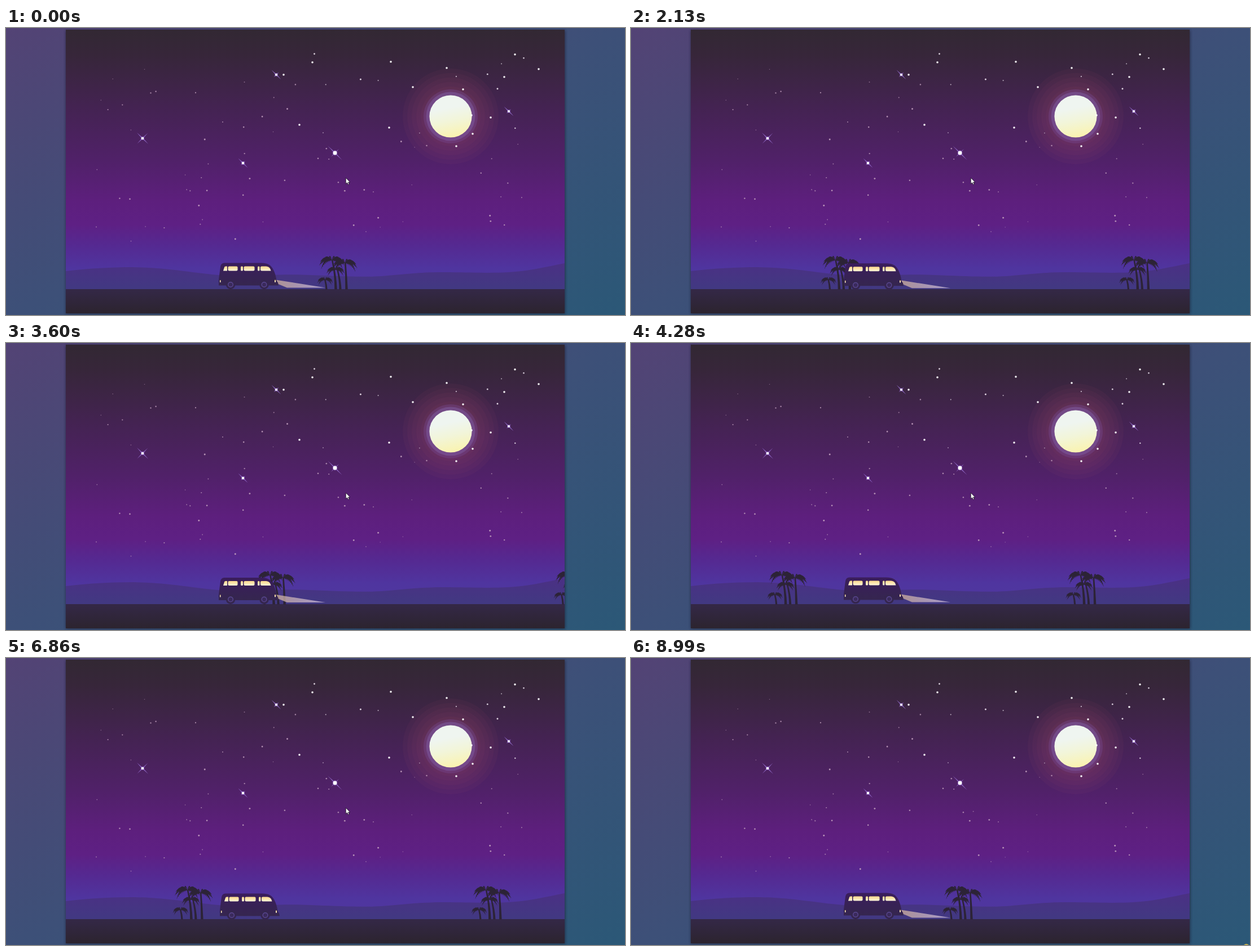
These frames come from a looping animation (1097x510 px, 9.07 s). An HTML page:

```html
<!DOCTYPE html>
<html lang="en">
<head>
<meta charset="utf-8">
<title>Night drive</title>
<style>
html, body { margin: 0; width: 100%; height: 100%; overflow: hidden; background: #3e5078; }
svg { display: block; width: 100vw; height: 100vh; }
</style>
</head>
<body>
<svg viewBox="0 0 1097 510" preserveAspectRatio="none">
  <defs>
    <linearGradient id="page" x1="0" y1="0" x2="1" y2="1">
      <stop offset="0" stop-color="#534375"/><stop offset=".5" stop-color="#3d5078"/><stop offset="1" stop-color="#2b5877"/>
    </linearGradient>
    <linearGradient id="sky" gradientUnits="userSpaceOnUse" x1="0" y1="3" x2="0" y2="464">
      <stop offset="0" stop-color="#322833"/><stop offset=".1" stop-color="#37263a"/>
      <stop offset=".3" stop-color="#442352"/><stop offset=".5" stop-color="#502168"/>
      <stop offset=".66" stop-color="#5d1f7d"/><stop offset=".75" stop-color="#5e2084"/>
      <stop offset=".83" stop-color="#552991"/><stop offset=".92" stop-color="#4f359f"/>
      <stop offset="1" stop-color="#4f389f"/>
    </linearGradient>
    <linearGradient id="hill" x1="0" y1="0" x2="0" y2="1">
      <stop offset="0" stop-color="#4b3084"/><stop offset="1" stop-color="#413982"/>
    </linearGradient>
    <linearGradient id="ground" x1="0" y1="0" x2="0" y2="1">
      <stop offset="0" stop-color="#342847"/><stop offset="1" stop-color="#2c242f"/>
    </linearGradient>
    <linearGradient id="moon" x1=".4" y1="0" x2=".6" y2="1">
      <stop offset=".3" stop-color="#eff5f0"/><stop offset=".6" stop-color="#f2f5d9"/><stop offset="1" stop-color="#faf3ae"/>
    </linearGradient>
    <linearGradient id="van" x1="0" y1="0" x2="0" y2="1">
      <stop offset="0" stop-color="#3a1d5c"/><stop offset="1" stop-color="#35264f"/>
    </linearGradient>
    <linearGradient id="glass" x1="0" y1="0" x2="0" y2="1">
      <stop offset="0" stop-color="#fbd88d"/><stop offset=".45" stop-color="#fde5ab"/><stop offset="1" stop-color="#fff6dc"/>
    </linearGradient>
    <linearGradient id="ray" x1="0" y1="0" x2="1" y2="0">
      <stop offset="0" stop-color="#d3b39a"/><stop offset=".35" stop-color="#ccb4b8"/><stop offset="1" stop-color="#cfc0e2"/>
    </linearGradient>
    <filter id="shadow" x="-5%" y="-5%" width="110%" height="110%"><feGaussianBlur stdDeviation="2"/></filter>
    <clipPath id="frame"><rect x="106" y="3" width="884" height="504"/></clipPath>
  </defs>

  <rect width="1097" height="510" fill="url(#page)"/>
  <circle id="dot" cx="1090.5" cy="514" r="6" fill="#c8b150"/>
  <rect x="106" y="4" width="885" height="504" fill="#1b1a30" opacity=".7" filter="url(#shadow)"/>

  <g clip-path="url(#frame)">
    <rect x="106" y="3" width="884" height="504" fill="url(#sky)"/>
    <g id="halo"></g>
    <circle cx="788" cy="157" r="37.6" fill="url(#moon)"/>
    <g id="stars"></g>
    <path fill="url(#hill)" d="M106 432C150 427 185 425 225 425C300 426 345 439 400 440C460 440 490 437 540 439C590 441 630 443 665 441C705 438 730 434 775 434C820 434 850 436 890 434C925 432 955 425 990 418V465H106Z"/>
    <rect x="106" y="464" width="884" height="43" fill="url(#ground)"/>
    <g id="palms" fill="#2c2336"></g>
    <g id="bus">
      <path id="beam" d="M478 447.5L566 461.5H498L479 453.5Z" fill="url(#ray)" opacity=".74"/>
      <path fill="url(#van)" d="M377 457.5V447L380 424Q381 417.5 387 417.5H452C464 417.5 469 421 473 428Q478 437 479.5 449L482 452.5L483 457.5Z"/>
      <g fill="url(#glass)">
        <path d="M385 431.5L387 425Q387.5 423.5 389 423.5H392V431.5Z"/>
        <rect x="393.5" y="423.5" width="17" height="8" rx="2"/>
        <rect x="416" y="423.5" width="4" height="8" rx="1.5"/>
        <rect x="421.5" y="423.5" width="19" height="8" rx="2"/>
        <rect x="446" y="423.5" width="3.5" height="8" rx="1.5"/>
        <path d="M451 425Q451 423.5 453 423.5H461Q466 424 468 427.5L469.5 431.5H453Q451 431.5 451 429.5Z"/>
        <rect x="379" y="448" width="1.5" height="4"/>
        <rect x="476" y="447.5" width="2" height="4.5" rx="1"/>
      </g>
      <g id="wheels"></g>
    </g>
  </g>
  <path id="cursor" d="M0 0V10.8L2.5 8.4L4.2 12L6 11.2L4.4 7.7H7.6Z" fill="#fff" stroke="#15101c" stroke-width=".8"/>
</svg>

<script>
const LOOP = 9070, TICK = 77, STEP = 22.28, GAP = 529;
const $ = id => document.getElementById(id);
const range = n => [...Array(n).keys()];

let seed = 7;
function random() {
  seed = (seed * 16807) % 2147483647;
  return seed / 2147483647;
}

// Moon glow: stacked pale discs, then two brighter rims
const disc = (r, fill, opacity) => `<circle cx="788" cy="157" r="${r}" fill="${fill}" opacity="${opacity}"/>`;
$('halo').innerHTML = range(5).map(i => disc(85 - 8 * i, '#96466a', .07)).join('') +
  disc(48, '#7a4a94', .35) + disc(43.5, '#8060a8', .45);

const star = (x, y, r, fill, opacity) => `<circle cx="${x}" cy="${y}" r="${r}" fill="${fill}" opacity="${opacity}"/>`;

// Small stars grow rosier and dimmer towards the horizon
function smallStar() {
  const x = 160 + 790 * random(), y = 45 + 335 * random(), size = random();
  return Math.hypot(x - 788, y - 157) < 50 ? '' :
    star(x.toFixed(1), y.toFixed(1), .7 + .8 * size, y < 200 && x > 520 ? '#f3eaf5' : '#c3a0bf', .55 + .35 * size);
}

// Diagonal sparkle: a long ray down-right and a shorter one across it
function sparkle(x, y, long, short, r) {
  const ray = (l, w) => `M${-l} ${-l}L${w} ${-w}L${l} ${l}L${-w} ${w}Z`;
  return `<g transform="translate(${x} ${y})" fill="#9c74d8"><path d="${ray(long, .8)}" opacity=".8"/>
    <path d="${ray(short, .8)}" transform="scale(-1 1)" opacity=".7"/>
    <circle r="${r + 1}" opacity=".5"/><circle r="${r}" fill="#fff"/></g>`;
}

const bright = [[543,61], [682,60], [781,71], [902,47], [944,73], [883,87], [721,105], [810,109],
  [859,159], [827,188], [798,210], [679,177], [520,172], [492,83], [825,155]];
$('stars').innerHTML = range(80).map(smallStar).join('') +
  bright.map(([x, y]) => star(x, y, 1.8, '#fff', .95)).join('') +
  sparkle(242, 196, 10, 9.5, 2.3) + sparkle(420, 240, 8.5, 4, 2.2) + sparkle(583, 222, 12.5, 7, 3.4) +
  sparkle(479, 83, 8.5, 4.5, 2) + sparkle(891, 148, 8.5, 4, 2);

// Curved frond with a ragged lower edge
function frond(x, y, dx, dy, lift, w) {
  const at = t => [x + 1.2 * t * (1 - t) * dx + t * t * dx, y - 2 * t * (1 - t) * lift + t * t * dy];
  const top = range(11).map(i => at(i / 10));
  const under = range(19).map(i => {
    const t = 1 - (i + 1) / 20, [px, py] = at(t);
    const drop = w * Math.sin(Math.PI * t ** .8) * (i % 2 ? .5 : 1);
    return [px - Math.sign(dx) * drop * .35, py + drop];
  });
  return 'M' + [...top, ...under].map(p => p.map(v => v.toFixed(1)).join(' ')).join('L') + 'Z';
}

// Fronds fan out evenly and sag at the sides
function crown(x, y, s) {
  const fan = range(10).map(i => {
    const a = (-32 + i * 244 / 9) * Math.PI / 180;
    return frond(x, y, 22.5 * s * Math.cos(a), s * (9 - 14 * Math.sin(a)), 11 * s, 7 * s);
  });
  return `<path d="${fan.join('')}"/>`;
}

function trunk(x, y, foot, w) {
  const mid = (y + 464) / 2;
  return `<path d="M${x - 1} ${y}Q${foot - 2} ${mid} ${foot - w} 464.5H${foot + w}Q${foot + 1} ${mid} ${x + 1.5} ${y}Z"/>`;
}

const grove = trunk(578, 413, 584.5, 2.3) + trunk(587, 429, 592.5, 2.1) + trunk(601, 417, 603.5, 2.2) +
  trunk(565, 447, 568, 1.6) + crown(577.5, 412, 1) + crown(600.5, 417, .98) +
  crown(584, 429, .72) + crown(565.5, 447, .62);
$('palms').innerHTML = [0, GAP].map(x => `<g transform="translate(${x})">${grove}</g>`).join('');

$('wheels').innerHTML = [398, 457.5].map(x => `<circle cx="${x}" cy="456" r="8.3" fill="#35264f"/>
  <circle cx="${x}" cy="456" r="4.3" fill="#3a2a5c" stroke="#5a4790" stroke-width="1.4"/>`).join('');

const rides = [{ from: 1440, to: 4980, lead: 15 }, { from: 6040, to: 7460, lead: 11 }];

const show = (id, on) => $(id).style.display = on ? '' : 'none';
const move = (id, x, y) => $(id).setAttribute('transform', `translate(${x} ${y})`);

function draw(t) {
  const ride = rides.find(r => t >= r.from && t < r.to);
  let shift = 0, bob = 0, lit = true;
  if (ride) {
    const n = Math.floor((t - ride.from) / TICK + .45);
    const phase = n % 12 / 11;
    shift = (ride.lead + STEP * n) % GAP;
    bob = -Math.cos(Math.PI * phase);
    lit = phase < 1; // the headlight blinks off once per bounce
  }
  move('palms', -shift, 0);
  move('bus', lit ? 0 : 2, bob);
  show('beam', lit);
  if (t < 8070) move('cursor', 602.2, 266.3);
  else move('cursor', 778, 369);
  show('cursor', t < 8140);
  show('dot', t >= 8990);
}

const start = performance.now();
function loop() {
  draw((performance.now() - start) % LOOP);
  requestAnimationFrame(loop);
}
loop();
</script>
</body>
</html>
```
